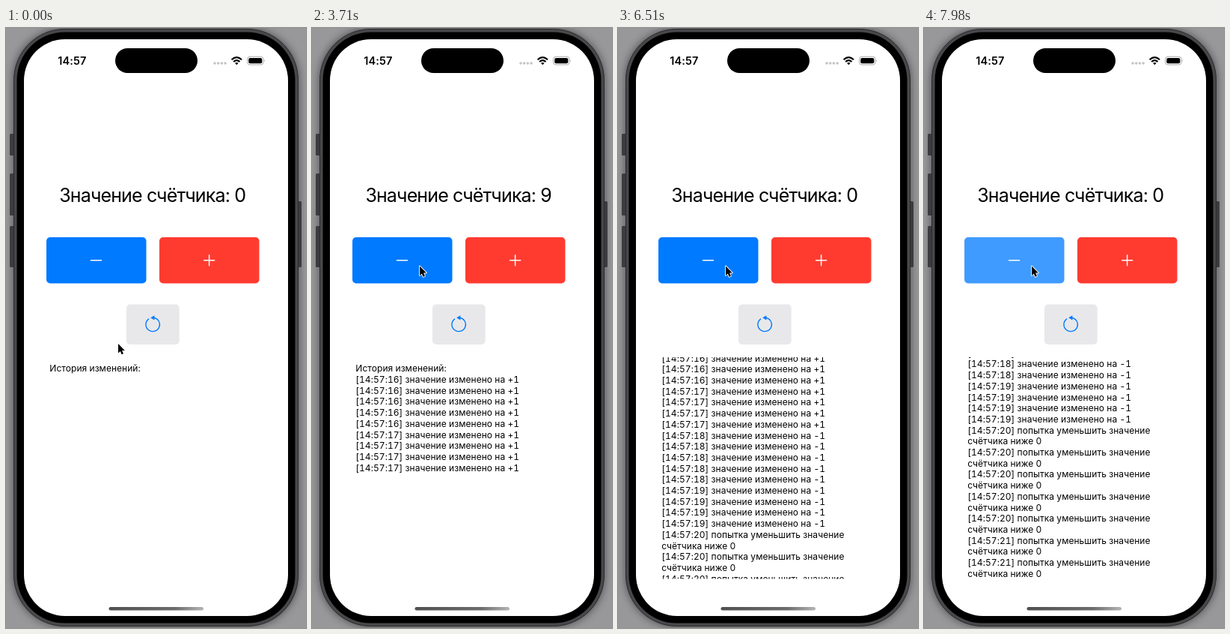
These frames come from a looping animation (401x800 px, 8 s). An HTML page:

```html
<!DOCTYPE html>
<html lang="ru">
<head>
<meta charset="utf-8">
<title>Счётчик</title>
<style>
  html, body { margin: 0; width: 100%; height: 100%; overflow: hidden; background: #98989b; }
  svg { display: block; width: 100%; height: 100%; }
  text { font-family: Inter, Roboto, sans-serif; font-optical-sizing: none; white-space: pre; fill: #000; }
  #value { font-size: 25px; letter-spacing: -.85px; text-anchor: middle; }
  #log text { font-size: 12px; letter-spacing: .05px; font-variant-numeric: tabular-nums; }
  .clock { font-size: 14.5px; font-weight: 600; letter-spacing: .15px; }
  .icon { fill: none; stroke: #fff; stroke-width: 1.5; stroke-linecap: round; }
</style>
</head>
<body>
<svg viewBox="0 0 401 800">
  <defs>
    <filter id="blur" x="-10%" y="-10%" width="120%" height="120%"><feGaussianBlur stdDeviation="6"/></filter>
    <linearGradient id="indicator">
      <stop offset="0" stop-color="#505050"/><stop offset=".7" stop-color="#6c6c6c"/>
      <stop offset="1" stop-color="#b4b4b4"/>
    </linearGradient>
    <clipPath id="logArea"><rect x="50" y="439" width="300" height="295.5"/></clipPath>
  </defs>

  <!-- Phone body and its shadow -->
  <rect width="401" height="800" fill="#98989b"/>
  <rect x="10" y="1" width="381" height="797" rx="68" opacity=".5" filter="url(#blur)"/>
  <g fill="#3c3c3f">
    <rect x="5" y="141" width="8" height="29" rx="1.5"/>
    <rect x="5" y="194" width="8" height="56" rx="1.5"/>
    <rect x="5" y="264" width="8" height="55" rx="1.5"/>
    <rect x="388" y="231" width="7" height="88" rx="1.5"/>
  </g>
  <rect x="10.5" y="1.5" width="380" height="796" rx="68" fill="#48484b" stroke="#2a2a2c"/>
  <rect x="14.5" y="5.5" width="372" height="788" rx="64"/>
  <rect x="24" y="15" width="353" height="769" rx="55" fill="#fff"/>

  <!-- Status bar -->
  <text class="clock" x="69.2" y="48.8">14:57</text>
  <rect x="146" y="27" width="110" height="33" rx="16.5"/>
  <g fill="#c4c4c6">
    <circle cx="279" cy="47" r="1.8"/><circle cx="283.7" cy="47" r="1.8"/>
    <circle cx="288.4" cy="47" r="1.8"/><circle cx="293.1" cy="47" r="1.8"/>
  </g>
  <g fill="none" stroke="#000" stroke-width="2.1">
    <path d="M301.6 42.3Q308.3 36.1 315 42.3"/>
    <path d="M304.1 45Q308.3 41.2 312.5 45"/>
  </g>
  <path d="M306 46.8Q308.3 45 310.6 46.8L308.3 49.2Z"/>
  <rect x="322.5" y="38.2" width="21.5" height="10.8" rx="3.4" fill="none" stroke="#a8a8a8"/>
  <rect x="324.2" y="39.9" width="18.1" height="7.4" rx="2.1"/>
  <path d="M345.2 41.8Q346.8 43.6 345.2 45.4Z" fill="#a8a8a8"/>

  <!-- Counter -->
  <text id="value" x="195.7" y="232.2"></text>
  <g id="minus">
    <rect x="54" y="279" width="133.5" height="61.5" rx="5" fill="#007aff"/>
    <path class="icon" d="M113.5 309.8H127.5"/>
  </g>
  <g id="plus">
    <rect x="205" y="279" width="133.5" height="61.5" rx="5" fill="#ff3b30"/>
    <path class="icon" d="M264.6 309.8H278.6M271.6 302.8V316.8"/>
  </g>
  <rect x="161" y="368.5" width="70.7" height="53.5" rx="5" fill="#e8e8ea"/>
  <path d="M197 386.2A9.2 9.2 0 1 1 190.5 388.1" fill="none" stroke="#007aff" stroke-width="1.4" stroke-linecap="round"/>
  <path d="M193.2 386.3L198.4 383.2V389.6Z" fill="#007aff"/>

  <g clip-path="url(#logArea)"><g id="log"></g></g>
  <rect x="137.5" y="772" width="126.5" height="4.6" rx="2.3" fill="url(#indicator)"/>

  <g id="cursor">
    <path d="M0 0V12.4L2.8 9.9L4.7 14.3L6.9 13.3L5.1 9H8.8Z" stroke="#fff" stroke-width="1.8" stroke-linejoin="round" paint-order="stroke"/>
  </g>
</svg>
<script>
const LOOP = 8000, LINE = 14.7, FIRST_Y = 458.3, VISIBLE_LINES = 18.6;
const PRESS = 65, SCROLL = 300;
const $ = id => document.getElementById(id);

const series = (kind, start, step, count) =>
  Array.from({ length: count }, (_, i) => ({ kind, at: start + i * step }));

const taps = [
  ...series('plus', 1740, 210, 9),
  ...series('minus', 3900, 195, 9),
  ...series('below', 5950, 230, 6),
  ...series('below', 7610, 400, 2),
];

const messages = {
  plus: ['значение изменено на +1'],
  minus: ['значение изменено на -1'],
  below: ['попытка уменьшить значение', 'счётчика ниже 0'],
};

function addLine(text, index) {
  const line = document.createElementNS('http://www.w3.org/2000/svg', 'text');
  line.setAttribute('x', 58.3);
  line.setAttribute('y', FIRST_Y + index * LINE);
  line.textContent = text;
  $('log').append(line);
  return line;
}

// Each tap keeps its log lines and how far they push the list up.
let lineCount = 1;
addLine('История изменений:', 0);
const overflow = lines => Math.max(0, (lines - 1 - VISIBLE_LINES) * LINE);
for (const tap of taps) {
  const second = 16 + Math.floor((tap.at - 1730) / 1035);
  const before = overflow(lineCount);
  tap.lines = messages[tap.kind].map((text, i) =>
    addLine(i ? text : `[14:57:${second}] ${text}`, lineCount++));
  tap.push = overflow(lineCount) - before;
}

const ease = p => {
  p = Math.min(1, Math.max(0, p));
  return p * p * (3 - 2 * p);
};

const moves = [
  { from: 840, to: 1470, dx: 116, dy: -104.3 },
  { from: 3430, to: 3690, dx: -122, dy: .8 },
];

function draw(t) {
  let value = 0, scroll = 0, pressed = '';
  for (const { kind, at, lines, push } of taps) {
    const done = t >= at;
    if (done) value += { plus: 1, minus: -1, below: 0 }[kind];
    else if (t >= at - PRESS) pressed = kind;
    scroll += push * ease((t - at) / SCROLL);
    for (const line of lines) line.style.display = done ? '' : 'none';
  }
  $('value').textContent = `Значение счётчика: ${value}`;
  $('log').setAttribute('transform', `translate(0 ${-scroll})`);
  $('plus').style.opacity = pressed === 'plus' ? .75 : 1;
  $('minus').style.opacity = pressed === 'minus' || pressed === 'below' ? .75 : 1;

  let x = 150, y = 421;
  for (const { from, to, dx, dy } of moves) {
    const p = ease((t - from) / (to - from));
    x += dx * p;
    y += dy * p;
  }
  $('cursor').setAttribute('transform', `translate(${x} ${y})`);
}

const start = performance.now();
function frame() {
  draw((performance.now() - start) % LOOP);
  requestAnimationFrame(frame);
}
frame();
</script>
</body>
</html>
```
